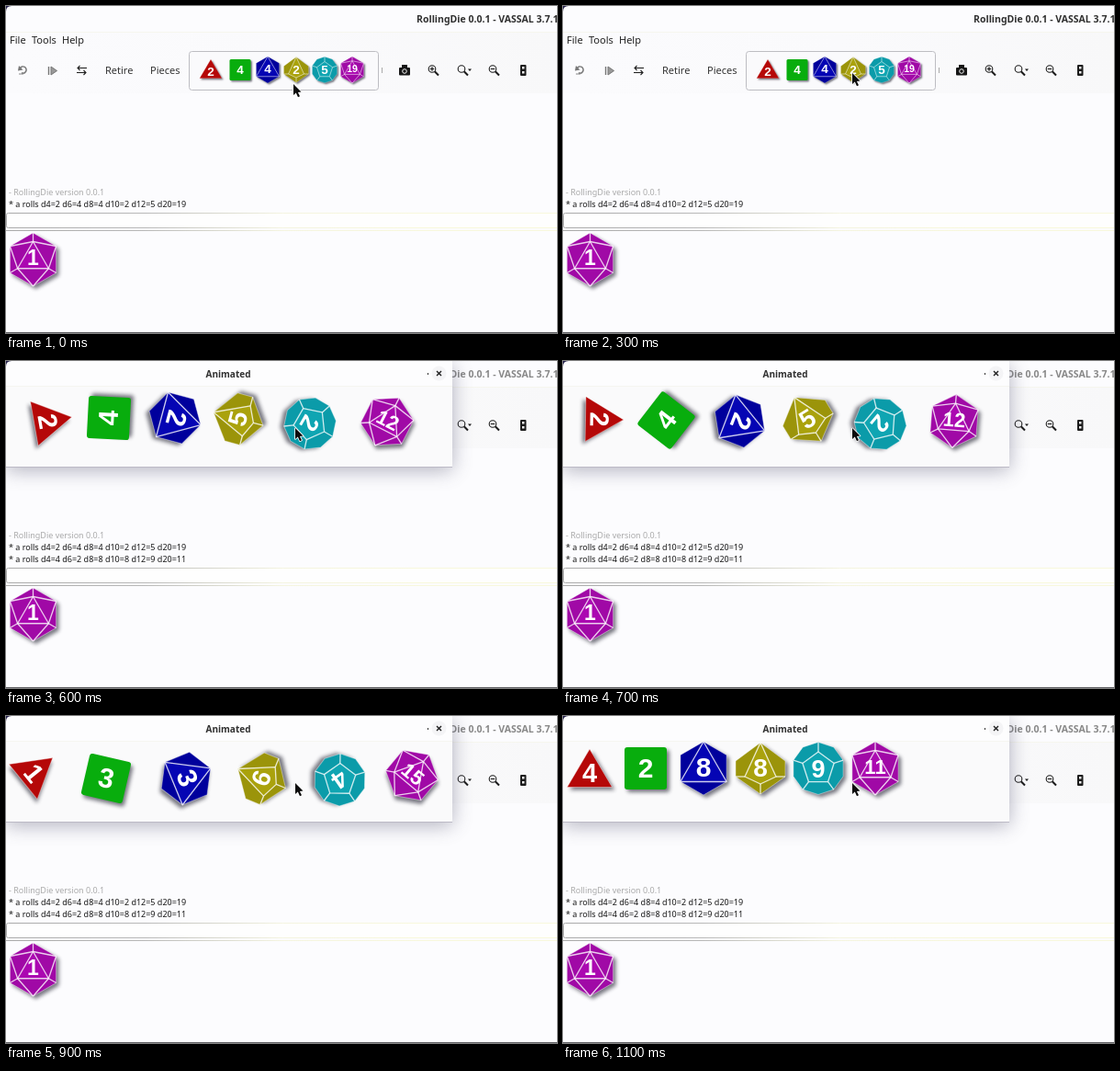
Recreate the animation shown at these times as an HTML page with a canvas. Size 600 px wide and 356 px high, loop 1200 ms.

```html
<!DOCTYPE html>
<html lang="en">
<head>
<meta charset="utf-8">
<title>Rolling dice</title>
<style>
html, body { margin: 0; width: 600px; height: 356px; overflow: hidden; background: #fcfcfe; }
canvas { display: block; }
</style>
</head>
<body>
<canvas id="stage" width="600" height="356"></canvas>
<script>
const ctx = document.getElementById('stage').getContext('2d');
const STEP = 100, STEPS = 12, OPEN = 6;
const SANS = '"Noto Sans", "Open Sans", sans-serif';
const DIGIT = '"Liberation Sans", Arial, sans-serif';

function rect(x, y, w, h, color) {
  ctx.fillStyle = color;
  ctx.fillRect(x, y, w, h);
}

function text(str, x, y, size = 11, color = '#222', weight = 400, align = 'left') {
  ctx.font = `${weight} ${size}px ${SANS}`;
  ctx.fillStyle = color;
  ctx.textAlign = align;
  ctx.textBaseline = 'alphabetic';
  ctx.fillText(str, x, y);
}

function trace(points, close) {
  ctx.beginPath();
  points.forEach(([x, y], i) => i ? ctx.lineTo(x, y) : ctx.moveTo(x, y));
  if (close) ctx.closePath();
}

function line(points, color, width = 1) {
  trace(points);
  ctx.strokeStyle = color;
  ctx.lineWidth = width;
  ctx.stroke();
}

function poly(points, color) {
  trace(points, true);
  ctx.fillStyle = color;
  ctx.fill();
}

function box(x, y, w, h, r, fill, stroke) {
  ctx.beginPath();
  ctx.roundRect(x, y, w, h, r);
  if (fill) { ctx.fillStyle = fill; ctx.fill(); }
  if (stroke) { ctx.strokeStyle = stroke; ctx.lineWidth = 1; ctx.stroke(); }
}

function shadow(color, blur, x, y) {
  ctx.shadowColor = color;
  ctx.shadowBlur = blur;
  ctx.shadowOffsetX = x;
  ctx.shadowOffsetY = y;
}

function fade(x0, y0, x1, y1, ...colors) {
  const g = ctx.createLinearGradient(x0, y0, x1, y1);
  colors.forEach((c, i) => g.addColorStop(i / (colors.length - 1), c));
  return g;
}

function ring(n, r, start = -90) {
  return Array.from({ length: n }, (_, i) => {
    const a = (start + i * 360 / n) * Math.PI / 180;
    return [r * Math.cos(a), r * Math.sin(a)];
  });
}

// Each shape: outline, front face, inner edges, digit size and height.
const hex = ring(6, 29), deca = ring(10, 28.5), penta = ring(5, 18);
const tri = ring(3, 19.5), kite = [[0, -28], [17, 9], [0, 17], [-17, 9]];
const shapes = {
  d4: { out: [[0, -23], [24.5, 18.5], [-24.5, 18.5]], edges: [], size: 29, dy: 3,
        color: '#b50808', dark: '#b50808' },
  d6: { out: [[-22, -22], [22, -22], [22, 22], [-22, 22]], edges: [], size: 30, dy: -1,
        color: '#08ad0d', dark: '#08ad0d', round: true },
  d8: { out: hex, face: [hex[0], hex[2], hex[4]], edges: [], size: 30, dy: -2,
        color: '#0505b4', dark: '#00009c' },
  d10: { out: [[0, -28], [27, -8], [27, 9], [0, 28], [-27, 9], [-27, -8]], face: kite,
         edges: [[kite[1], [27, 9]], [kite[2], [0, 28]], [kite[3], [-27, 9]]],
         size: 28, dy: -1, color: '#aaa20c', dark: '#9b940a' },
  d12: { out: deca, face: penta, edges: penta.map((p, i) => [p, deca[i * 2]]),
         size: 27, dy: 0, color: '#0fa5b2', dark: '#0b9ba9' },
  d20: { out: hex, face: tri,
         edges: tri.flatMap((p, i) => [5, 0, 1].map(k => [p, hex[(i * 2 + k) % 6]])),
         size: 22, dy: -2, color: '#ab08b1', dark: '#a009a6' }
};

function die(kind, x, y, value, scale = 1, angle = 0, size) {
  const s = shapes[kind], a = angle * Math.PI / 180;
  ctx.save();
  ctx.translate(x, y);
  ctx.rotate(a);
  ctx.scale(scale, scale);
  ctx.lineJoin = 'round';
  // the shadow turns with the die
  const reach = 4.2 * scale, side = a + Math.PI / 4;
  shadow('rgba(30,30,45,.6)', 4 * scale, reach * Math.cos(side), reach * Math.sin(side));
  if (s.round) box(-23, -23, 46, 46, 3, s.dark);
  else poly(s.out, s.dark);
  ctx.shadowColor = 'transparent';
  const edge = 'rgba(255,255,255,.8)';
  if (s.face) {
    poly(s.face, s.color);
    line([...s.face, s.face[0]], edge, 1.3);
  }
  s.edges.forEach(e => line(e, edge, 1.3));
  if (!s.round) line([...s.out, s.out[0]], 'rgba(255,255,255,.4)', 1);
  ctx.font = `bold ${size || s.size}px ${DIGIT}`;
  ctx.fillStyle = '#fff';
  ctx.textAlign = 'center';
  ctx.textBaseline = 'alphabetic';
  ctx.fillText(value, 0, s.dy + (size || s.size) * .36);
  ctx.restore();
}

const buttonDice = [['d4', 223, 2], ['d6', 255, 4], ['d8', 285, 4],
                    ['d10', 316, 2], ['d12', 347, 5], ['d20', 377, 19]];

// Poses at each key step: x, y, angle, value.
const KEYS = [6, 8, 10, 11];
const rolls = {
  d4: [[49, 65, 80, 2], [37, 62, 102, 1], [29, 58, 0, 4], [29, 59, 0, 4]],
  d6: [[112, 62, -87, 4], [113, 67, -18, 3], [105, 69, 44, 1], [90, 57, 0, 2]],
  d8: [[184, 62, 105, 2], [201, 69, 117, 3], [191, 67, 18, 1], [153, 57, 0, 8]],
  d10: [[253, 63, -75, 5], [280, 64, 12, 6], [277, 72, -148, 3], [215, 57, 0, 8]],
  d12: [[331, 68, 120, 2], [360, 69, 140, 4], [367, 70, 150, 5], [278, 57, 0, 9]],
  d20: [[415, 66, 27, 12], [437, 65, -18, 15], [447, 64, 98, 10], [340, 57, 0, 11]]
};

function pose(keys, step) {
  let i = 0;
  while (i < KEYS.length - 2 && step >= KEYS[i + 1]) i++;
  const k = (step - KEYS[i]) / (KEYS[i + 1] - KEYS[i]);
  const a = keys[i], b = keys[i + 1];
  const turn = ((b[2] - a[2] + 540) % 360 + 360) % 360 - 180;
  const mix = n => a[n] + (b[n] - a[n]) * k;
  return { x: mix(0), y: mix(1), angle: a[2] + turn * k, value: k < 1 ? a[3] : b[3] };
}

function lens(x, sign) {
  const c = '#1c1c1c';
  ctx.beginPath();
  ctx.arc(x - 1.5, 68.5, 3.8, 0, 7);
  ctx.strokeStyle = c;
  ctx.lineWidth = 1.1;
  ctx.stroke();
  line([[x + 1.3, 71.3], [x + 5.5, 75.5]], c, 2);
  if (sign) line([[x - 3.7, 68.5], [x + .7, 68.5]], c, 1.2);
  if (sign === '+') line([[x - 1.5, 66.3], [x - 1.5, 70.7]], c, 1.2);
}

function icons() {
  // undo
  ctx.beginPath();
  ctx.arc(18.5, 69.5, 3.6, -2.6, 2);
  ctx.strokeStyle = '#777';
  ctx.lineWidth = 1.5;
  ctx.stroke();
  poly([[13, 70.5], [14, 65], [18.5, 69.5]], '#777');
  line([[14, 74], [19, 74]], '#888', 1);
  // step
  line([[46.5, 66], [46.5, 75]], '#777', 1.4);
  poly([[49, 66], [55.5, 70.5], [49, 75]], '#999');
  line([[49, 66], [55.5, 70.5], [49, 75], [49, 66]], '#777', 1);
  // swap
  line([[78, 67.5], [88, 67.5]], '#222', 1.1);
  line([[80.5, 65], [78, 67.5], [80.5, 70]], '#222', 1.1);
  line([[77, 72.5], [87, 72.5]], '#222', 1.1);
  line([[84.5, 70], [87, 72.5], [84.5, 75]], '#222', 1.1);
  // camera
  box(428, 67, 12, 8.5, 1, '#161616');
  rect(431, 64, 6, 3, '#161616');
  ctx.beginPath();
  ctx.arc(434, 71, 2.3, 0, 7);
  ctx.strokeStyle = '#eee';
  ctx.lineWidth = 1;
  ctx.stroke();
}

function zoomIcons() {
  lens(465.5, '+');
  lens(497.5);
  poly([[503, 68.5], [507, 68.5], [505, 71]], '#1c1c1c');
  lens(531.5, '-');
  box(560, 64, 6.5, 12, 1, '#1c1c1c');
  rect(562, 66, 2.5, 2.5, '#eee');
  rect(562, 71, 2.5, 2.5, '#eee');
}

function mainWindow(step) {
  const open = step >= OPEN;
  rect(0, 0, 600, 356, '#fcfcfe');
  rect(0, 28, 600, 67, fade(0, 0, 600, 0, '#fbfbfd', '#fafafc', '#f8f8f9'));
  rect(0, 28, 600, 1, '#f6f6ee');
  text('RollingDie 0.0.1 - VASSAL 3.7.1', 447, 17.5, 10.5, open ? '#888' : '#303030', 700);
  if (!open) {
    [['File', 4], ['Tools', 28], ['Help', 61]].forEach(([s, x]) => text(s, x, 40.5, 11, '#222'));
    text('Retire', 108, 74, 11, '#333');
    text('Pieces', 157, 74, 11, '#333');
    icons();
    if (step === OPEN - 1) box(199, 48, 207, 43, 2, '#d5d2d6');
    else box(199.5, 49.5, 206, 42, 3, '#fafafc', '#bdbdc2');
    buttonDice.forEach(([kind, x, n]) => die(kind, x, 69.5, n, .5, 0, kind === 'd20' ? 21 : 27));
    rect(409, 67, 1, 6, '#aaa');
  }
  zoomIcons();
}

function chat(open) {
  const lines = [['- RollingDie version 0.0.1', '#aaa'],
                 ['* a rolls d4=2 d6=4 d8=4 d10=2 d12=5 d20=19', '#161616']];
  if (open) lines.push(['* a rolls d4=4 d6=2 d8=8 d10=8 d12=9 d20=11', '#161616']);
  lines.forEach(([s, c], i) => text(s, 3, 219 - 13 * (lines.length - 1 - i), 9, c));
  const edge = fade(0, 0, 600, 0, '#aaa', '#b8b8b8', '#f4f4e0', '#f8f8dc', '#f8f8dc');
  box(.5, 225.5, 602, 16, 2, '#fefefe', edge);
  rect(0, 244, 600, 1, edge);
  die('d20', 29.5, 276, 1, 1, 0, 23);
  rect(0, 355, 600, 1, '#66666a');
}

function dialog(step) {
  ctx.save();
  shadow('rgba(70,70,100,.42)', 20, 0, 4);
  rect(0, 0, 486, 115, '#fafafb');
  ctx.restore();
  rect(0, 0, 486, 27, '#fdfdfe');
  rect(0, 27, 486, 1, '#f5f5f0');
  rect(0, 115, 486, 1, '#bcbac6');
  text('Animated', 242, 17.5, 10, '#303030', 700, 'center');
  ctx.beginPath();
  ctx.arc(471.5, 13.5, 8, 0, 7);
  ctx.fillStyle = '#f4f4f6';
  ctx.fill();
  line([[469, 11], [474, 16]], '#222', 1.4);
  line([[474, 11], [469, 16]], '#222', 1.4);
  rect(459, 13, 1, 2, '#333');
  for (const kind in rolls) {
    const p = pose(rolls[kind], step);
    die(kind, p.x, p.y, p.value, 1, p.angle);
  }
}

function cursor(step) {
  const k = Math.min(step / 3, 1);
  ctx.save();
  ctx.translate(313 + 2 * k, 85 - 12 * k);
  const arrow = [[0, 0], [0, 12], [2.8, 9.6], [5, 14.2], [7, 13.2], [4.9, 8.9], [8.5, 8.5]];
  ctx.lineJoin = 'round';
  line([...arrow, arrow[0]], '#fff', 1.6);
  poly(arrow, '#0c0c0c');
  ctx.restore();
}

function draw(step) {
  const open = step >= OPEN;
  mainWindow(step);
  chat(open);
  if (open) dialog(step);
  // dark window corner
  ctx.beginPath();
  ctx.moveTo(0, 0);
  ctx.lineTo(6, 0);
  ctx.quadraticCurveTo(0, 0, 0, 6);
  ctx.closePath();
  ctx.fillStyle = '#26224c';
  ctx.fill();
  cursor(step);
}

const start = performance.now();
function tick() {
  const t = Math.max(0, performance.now() - start);
  draw(Math.floor(t / STEP) % STEPS);
  requestAnimationFrame(tick);
}
tick();
</script>
</body>
</html>
```
